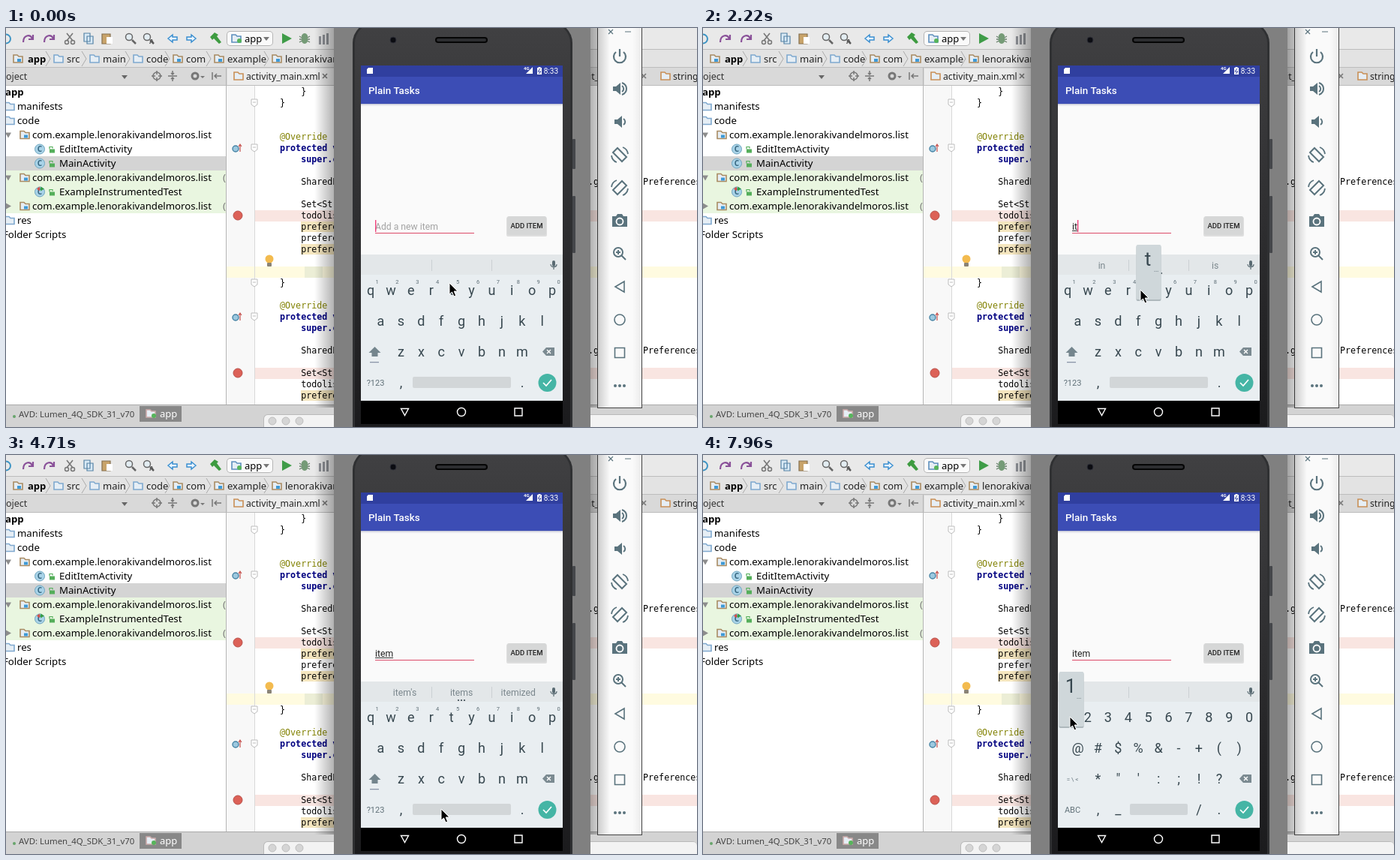
These frames come from a looping animation (921x532 px, 8000 ms). An HTML page with a canvas:

```html
<!DOCTYPE html>
<html lang="en">
<head>
<meta charset="utf-8">
<title>Typing into a phone emulator</title>
<style>
html, body { margin: 0; width: 100%; height: 100%; overflow: hidden; }
canvas { display: block; }
</style>
</head>
<body>
<canvas id="view" width="921" height="532"></canvas>
<script>
const LOOP = 8000, TICK = 147.4;
const UI = "'Noto Sans', sans-serif", MONO = "'DejaVu Sans Mono', monospace", PHONE = "Roboto, sans-serif";
const SLATE = '#5a737d', KEY = '#37474f';
const view = document.getElementById('view').getContext('2d');
const backdrop = document.createElement('canvas');
backdrop.width = 921;
backdrop.height = 532;
let g = backdrop.getContext('2d');

function rect(x, y, w, h, fill, r = 0) {
  g.fillStyle = fill;
  g.beginPath();
  g.roundRect(x, y, w, h, r);
  g.fill();
}
function text(s, x, y, font, fill = '#000', align = 'left') {
  g.font = font;
  g.fillStyle = fill;
  g.textAlign = align;
  g.fillText(s, x, y);
}
function shape(d, x, y, fill, stroke, width = 1.5) {
  const path = new Path2D(d);
  g.save();
  g.translate(x, y);
  if (fill) { g.fillStyle = fill; g.fill(path); }
  if (stroke) { g.strokeStyle = stroke; g.lineWidth = width; g.stroke(path); }
  g.restore();
}
function dot(x, y, r, fill, stroke, width) {
  shape(`M${r} 0A${r} ${r} 0 1 1 ${-r} 0A${r} ${r} 0 1 1 ${r} 0Z`, x, y, fill, stroke, width);
}
function fade(x0, y0, x1, y1, from, to) {
  const grad = g.createLinearGradient(x0, y0, x1, y1);
  grad.addColorStop(0, from);
  grad.addColorStop(1, to);
  return grad;
}
function shadow(x0, x1, from, to) {
  rect(x0, 0, x1 - x0, 506, fade(x0, 0, x1, 0, `rgba(0,0,0,${from})`, `rgba(0,0,0,${to})`));
}

function folder(x, y, color = '#7fa9cf') {
  shape('M-6-5H-1L1-3H6V5H-6Z', x, y, '#e6eef5', color, 1.6);
}
function sourceFolder(x, y) {
  folder(x, y, '#a98b62');
  rect(x - 1, y, 5, 4, '#3f9ad6');
}
function lens(x, y) {
  dot(x - 2, y - 2, 4.5, '#e3edf2', '#666', 1.5);
  shape('M2 2L7 7', x, y, null, '#666', 2.5);
}

function drawToolbar() {
  rect(0, 0, 921, 29, '#e9e9e9');
  rect(0, 29, 921, 24, '#e3e3e3');
  rect(0, 53, 921, 23, '#d9d9d9');
  for (const y of [28, 52, 76]) rect(0, y, 921, 1, '#bdbdbd');
  shape('M-4-4A6 6 0 1 1-4 5', 0, 14, null, '#3d94c4', 2);
  shape('M6 0C3-6-6-5-6 5M7-5V1H1', 57, 14, null, '#8a5199', 2.2);
  shape('M6 0C3-6-6-5-6 5M7-5V1H1', 29, 14, null, '#8a5199', 2.2);
  shape('M-4-7L4 3M4-7L-4 3', 85, 14, null, '#777', 1.6);
  dot(81, 19, 2.5, null, '#777');
  dot(89, 19, 2.5, null, '#777');
  shape('M-6-7H2V4H-6ZM-2-3H6V7H-2Z', 110, 14, '#d8e9f5', '#5683a6', 1.2);
  shape('M-6-6H5V7H-6Z', 134, 14, '#c8a36a', '#85704f', 1.2);
  rect(134, 12, 8, 9, '#fff');
  lens(166, 14);
  lens(190, 14);
  text('A', 191, 21, `bold 9px ${UI}`, '#555');
  for (const [x, s] of [[222, 1], [247, -1]])
    shape(`M${-6 * s} 0L0-5V-2H${6 * s}V2H0V5Z`, x, 14, '#e9f4ff', '#3b8fd0', 1.5);
  shape('M-7-2L-1-8L4-5L2-3L8 5L5 7L-2 0L-4 2Z', 279, 14, '#3d9b40');
  rect(294, 4, 62, 20, '#b5b5b5', 5);
  rect(295, 5, 60, 18, '#fafafa', 4);
  folder(307, 14, '#5d8fbd');
  dot(311, 17, 3, '#56b45b');
  text('app', 318, 19, `13px ${UI}`);
  shape('M-4-2H4L0 3Z', 347, 14, '#777');
  shape('M-6-7L7 0L-6 7Z', 374, 14, '#3f9c48');
  shape('M-7-4L7 4M7-4L-7 4M-7 0H7', 398, 15, null, '#69806c', 1.4);
  shape('M-4-4C-2-8 2-8 4-4V4C2 8-2 8-4 4Z', 398, 14, '#759b77');
  for (let i = 0; i < 3; i++) rect(417 + i * 5, 11 - i * 2, 3, 11 + i * 2, '#8e9196');

  sourceFolder(16, 41);
  text('app', 29, 46, `bold 13px ${UI}`);
  const crumbs = [['src', 70], ['main', 118], ['code', 176], ['com', 229], ['example', 284], ['lenorakivan', 361]];
  for (const [name, x] of crumbs) {
    name.length > 4 || name === 'com' ? sourceFolder(x, 41) : folder(x, 41);
    text(name, x + 11, 46, `13px ${UI}`, '#222');
    shape('M-2-10L4 0L-2 10', x - 15, 41, null, '#aaa', 1);
  }
}

function drawTree() {
  rect(0, 77, 293, 426, '#fff');
  rect(0, 171, 293, 19, '#d4d4d4');
  rect(0, 190, 293, 57, '#e9f6e0');
  text('oject', 0, 69, `12.5px ${UI}`, '#333');
  shape('M-4-2H4L0 3Z', 158, 65, '#666');
  dot(201, 64, 5, null, '#777');
  shape('M-7 0H-2M2 0H7M0-7V-2M0 2V7', 201, 64, null, '#777');
  shape('M-6 0H6M0-7V-2M-2-4L0-2L2-4M0 7V2M-2 4L0 2L2 4', 222, 64, null, '#777');
  dot(252, 64, 4, null, '#777', 3);
  shape('M-3-1H3L0 2Z', 262, 65, '#777');
  shape('M-6-5V5M6 0H-3M0-3L-3 0L0 3', 281, 64, null, '#777');
  const font = `13.2px ${UI}`;
  const pack = 'com.example.lenorakivandelmoros.list';
  const rows = [['app', -1], ['manifests', 15], ['code', 15], [pack, 35], ['EditItemActivity', 71], ['MainActivity', 71],
    [pack, 35], ['ExampleInstrumentedTest', 71], [pack, 35], ['res', 15], ['Folder Scripts', -4]];
  rows.forEach(([name, x], i) => {
    const y = 85.5 + i * 19;
    text(name, x, y + 4.5, i ? font : `bold ${font}`);
    if (x === 15) folder(5, y);
    if (x === 35) {
      sourceFolder(25, y);
      shape(i < 8 ? 'M-4-3H4L0 4Z' : 'M-3-4L4 0L-3 4Z', 3, y, '#8c8c8c');
      if (i > 3) text('(', 289, y + 4.5, font, '#777');
    }
    if (x === 71) {
      dot(45, y, 6.5, '#a9d3e8', '#6ea5bf', 1);
      text('C', 45, y + 3.5, `bold 10px ${UI}`, '#36667f', 'center');
      rect(58, y, 7, 5, '#54ae5a');
      shape('M-2 0V-3H2V-1', 60, y, null, '#54ae5a', 1.2);
      if (i === 7) {
        shape('M0-3L5 0L0 3Z', 46, y - 4, '#379d43');
        shape('M0-3L-4 0L0 3Z', 45, y - 4, '#d34f45');
      }
    }
  });
}

function drawEditor() {
  rect(294, 77, 627, 426, '#fff');
  rect(294, 77, 37, 426, '#f8f8f8');
  rect(294, 318, 627, 15, '#fffbe0');
  rect(398, 318, 24, 15, '#eceed6');
  for (const y of [243, 453]) {
    rect(332, y, 589, 15, '#f9e5e1');
    dot(309, y + 7, 6, '#dc6157', '#b8504a', 1);
  }
  rect(331, 77, 1, 426, '#d9d9d9');
  rect(293, 53, 1, 450, '#b5b5b5');
  rect(295, 54, 142, 22, '#ececec');
  folder(310, 64, '#c98f55');
  text('activity_main.xml', 320, 69, `12.2px ${UI}`, '#222');
  text('it_', 777, 69, `12.2px ${UI}`, '#222');
  folder(879, 64, '#c98f55');
  text('strings', 889, 69, `12.2px ${UI}`, '#222');
  for (const x of [425, 850]) shape('M-3-3L3 3M3-3L-3 3', x, 64, null, '#777', 1.6);

  const font = `11.7px ${MONO}`;
  for (const y of [265, 295, 490]) rect(393, y - 7, 50, 14, '#f5e6bf');
  const code = [[85, '    }'], [100, '}'], [145, '@Override'], [160, 'protected v'], [175, '    super.c'], [205, '    SharedP'],
    [235, '    Set<Str'], [250, '    todolis'], [265, '    prefere'], [280, '    prefere'], [295, '    prefere'], [340, '}'],
    [370, '@Override'], [385, 'protected v'], [400, '    super.c'], [430, '    SharedP'], [460, '    Set<Str'],
    [475, '    todolis'], [490, '    prefere']];
  for (const [y, line] of code) {
    const keyword = /protected|super/.test(line);
    const color = keyword ? '#000080' : line[0] === '@' ? '#808000' : '#000';
    text(line, 365, y + 4, keyword ? `bold ${font}` : font, color);
    if (keyword && line[0] === 'p') {
      dot(306, y + 1, 4, '#9cc8df', '#4784a5', 1.4);
      shape('M0 5V-5M-2-2L0-5L2-2', 312, y, null, '#c75450', 1.2);
    }
    if (keyword && line[0] === 'p' || line === '}')
      shape('M-4-5H4V2L0 5L-4 2ZM-2-1H2', 331, y, '#fff', '#bcbcbc', 1);
  }
  for (const y of [205, 430]) {
    text('.g', 776, y + 4, font);
    text('Preferences', 849, y + 4, font);
  }
  dot(351, 308, 5.5, '#f3bb4f');
  rect(348, 313, 6, 5, '#8a8375', 1);
}

function drawStatusBar() {
  rect(0, 502, 921, 30, '#d3d3d3');
  rect(0, 502, 921, 1, '#aaa');
  rect(178, 504, 56, 21, '#888');
  dot(11, 518, 2, '#67a56b');
  text('AVD: Lumen_4Q_SDK_31_v70', 17, 518.5, `11.4px ${UI}`, '#444');
  folder(193, 514, '#caa');
  dot(197, 517, 3, '#56b45b');
  text('app', 205, 518.5, `13px ${UI}`, '#fff');
  rect(343, 515, 578, 30, '#b9b9b9', 6);
  rect(344, 516, 577, 30, '#f3f3f3', 5);
  for (const x of [355, 373, 391]) dot(x, 524, 5, '#d5d5d5', '#bdbdbd', 1);
}

function drawPhone() {
  shadow(411, 437, 0, .3);
  rect(437, 0, 342, 532, '#808080');
  for (const [y, h] of [[148, 40], [224, 76]]) rect(755, y, 4, h, '#45474b', 1);
  rect(462, -8, 293, 590, '#2f3032', 28);
  rect(465, -6, 287, 582, fade(0, 0, 0, 532, '#404042', '#1b1b1d'), 26);
  rect(572, 12, 70, 8, '#050505', 4);
  rect(574, 14, 66, 4, '#2d2e31', 2);
  dot(516, 16, 4, '#0b0c11', '#2c2d36', 1);
  rect(473, 50, 269, 478, '#000');

  rect(473, 50, 269, 15, '#303f9f');
  rect(473, 65, 269, 36, '#3c4db5');
  rect(473, 101, 269, 202, '#fafafa');
  rect(473, 101, 269, 1, '#b9bcd0');
  rect(473, 102, 269, 2, '#e9e9ee');
  shape('M-2-4H4V4H-4V-2Z', 485, 57, '#fff');
  text('4G', 690, 56, `bold 6px ${PHONE}`, '#fff');
  shape('M4-5V4H-5Z', 698, 57, '#fff');
  shape('M-1.5-5H1.5V-4H3V5H-3V-4H-1.5Z', 711, 57, '#fff');
  shape('M1-3L-2 1H2L-1 4', 711, 57, null, '#303f9f', 1);
  text('8:33', 736, 61, `10px ${PHONE}`, '#fff', 'right');
  text('Plain Tasks', 483, 88, `500 13.4px ${PHONE}`, '#fff');
  rect(667, 252, 54, 26, '#dedede', 2);
  rect(668, 251, 52, 25, '#d6d7d7', 2);
  text('ADD ITEM', 694, 266.8, `500 9.5px ${PHONE}`, '#222', 'center');
  rect(492, 273, 132, 1, '#dc4a68');

  rect(473, 302, 269, 27, '#e3e7e9');
  rect(473, 329, 269, 168, '#e9eef1');
  rect(567, 309, 1, 15, '#cbd0d3');
  rect(647, 309, 1, 15, '#cbd0d3');
  rect(728, 310, 4, 8, '#596a72', 2);
  shape('M-4 0C-4 5 4 5 4 0M0 4V7', 730, 315, null, '#596a72', 1.2);
  shape('M-8 0L-3-5.5H8V5.5H-3Z', 723, 431.5, '#7b8a91');
  shape('M-2-2.5L3 2.5M3-2.5L-2 2.5', 723, 431.5, null, '#fff', 1.3);
  dot(721.5, 473, 12, '#45b5a5');
  shape('M-5 0L-1 4L6-4', 721, 473, null, '#fff', 1.7);

  shape('M-5-4.5H5L0 4.5Z', 531.5, 512, null, '#fff', 1.4);
  dot(607, 512, 5.5, null, '#fff', 1.4);
  shape('M-5-5H5V5H-5Z', 683, 512, null, '#fff', 1.4);
}

function drawSidebar() {
  rect(788, -2, 60, 509, '#444');
  rect(789, 0, 58, 506, '#fafafa');
  shadow(779, 789, .3, .18);
  shadow(789, 805, .18, 0);
  shadow(835, 847, 0, .06);
  shape('M-3-3L3 3M3-3L-3 3M19 0H27', 806, 5, null, SLATE, 1.2);
  shape('M-5-6A8 8 0 1 0 5-6M0-10V0', 818, 38, null, SLATE, 2.2);
  const speaker = 'M-9-3H-5L1-8V8L-5 3H-9Z';
  shape(speaker, 818, 81, SLATE);
  shape('M3-4C6-2 6 2 3 4M3-8C11-5 11 5 3 8', 818, 81, null, SLATE, 2);
  shape(speaker, 820, 125, SLATE);
  shape('M3-4C6-2 6 2 3 4', 820, 125, null, SLATE, 2);
  for (const [y, s] of [[169, 1], [213, -1]]) {
    shape(`M${-9 * s}-3L${-3 * s}-9L${9 * s} 3L${3 * s} 9Z`, 818, y, null, SLATE, 2);
    shape(`M${4 * s}-10Q${10 * s}-8 ${11 * s}-1M${-4 * s} 10Q${-10 * s} 8 ${-11 * s} 1`, 818, y, null, SLATE, 1.8);
  }
  shape('M-10-6H-5L-3-9H3L5-6H10V8H-10Z', 818, 257, SLATE);
  dot(818, 258, 4.5, SLATE, '#fff', 1.8);
  dot(816, 299, 6, null, SLATE, 2);
  shape('M2 2L8 8M-5-2H1M-2-5V1', 818, 301, null, SLATE, 2);
  shape('M-6 0L6-7V7Z', 818, 345, null, SLATE, 1.6);
  dot(818, 389, 7, null, SLATE, 1.6);
  shape('M-6.5-6.5H6.5V6.5H-6.5Z', 818, 433, null, SLATE, 1.6);
  for (const x of [812, 818, 824]) dot(x, 477, 2, SLATE);
}

const typed = [[-1.7, ''], [5.2, 'i'], [13.5, 'it'], [19.8, 'ite'], [27.1, 'item'], [48.9, 'item ']];
const hints = [[0, []], [7, ['in', 'I', 'is']], [16, ["it's", 'it', 'its']], [22, ['items', 'ITE', 'site']],
  [29, ["item's", 'items', 'itemized']], [49, []]];
const presses = [[6, 7, 'i', 674.5, 350], [14, 16, 't', 594, 350], [20, 22, 'e', 540, 350], [27, 29, 'm', 688, 432],
  [54, 56, '1', 486, 350]];
const pointer = [[0, 591, 340], [2, 668, 365], [3, 683, 358], [4, 683, 358], [5, 670, 347], [8, 670, 347], [12, 583, 349],
  [18, 583, 349], [20, 533, 349], [21, 533, 349], [24, 670, 422], [26, 680, 432], [28, 680, 432], [31, 590, 478],
  [32, 580, 472], [33, 580, 472], [36, 490, 470], [41, 491, 470], [43, 598, 474], [49, 598, 474], [53, 489, 349], [60, 489, 349]];
const SYMBOLS_FROM = 37, BLINK = 3.4;

const latest = (list, n) => list.filter(item => item[0] <= n).pop();

function pointerAt(n) {
  const i = pointer.findIndex(p => p[0] > n);
  const [t0, x0, y0] = pointer[i - 1], [t1, x1, y1] = pointer[i];
  const k = (n - t0) / (t1 - t0);
  return [x0 + (x1 - x0) * k, y0 + (y1 - y0) * k];
}

function drawField(n) {
  const [since, value] = latest(typed, n);
  text(value || 'Add a new item', 492, 268.5, `12.2px ${PHONE}`, value ? '#222' : '#a3a3a3');
  const width = value ? g.measureText(value).width : 0;
  if (value && !value.endsWith(' ')) rect(492, 270, width, 1, '#333');
  if (Math.floor((n - since) / BLINK) % 2 === 0) rect(492 + width, 256, 1.4, 16, '#f0407a');
}

function drawHints(n) {
  const words = latest(hints, n)[1];
  words.forEach((word, i) => text(word, 531.5 + i * 75.6, 321, `12.2px ${PHONE}`, '#7b878d', 'center'));
  if (words.length) for (const x of [603, 607, 611]) dot(x, 327, 1.1, KEY);
}

function drawKeys(symbols) {
  const row = (keys, x, y) => [...keys].forEach((key, i) =>
    text(key, x + i * 26.9, y + 6, `18px ${PHONE}`, KEY, 'center'));
  const small = (s, size) => text(s, 492.5, size === 8 ? 435 : 477, `${size}px ${PHONE}`, '#607078', 'center');
  row(symbols ? '1234567890' : 'qwertyuiop', 486, 350);
  row(symbols ? '@#$%&-+()' : 'asdfghjkl', 499.5, 391);
  row(symbols ? '*"\':;!?' : 'zxcvbnm', 526.5, 432);
  row(symbols ? ',_' : ',', 526.5, 473);
  row(symbols ? '/.' : '.', symbols ? 661 : 688, 473);
  small(symbols ? 'ABC' : '?123', 11);
  if (symbols) {
    small('= \\ <', 8);
    rect(569, 465, 77, 15, '#d0d5d8', 2);
  } else {
    [...'1234567890'].forEach((d, i) => text(d, 494.5 + i * 26.9, 341, `7.5px ${PHONE}`, '#5c6c74', 'center'));
    shape('M0-7L8 1H4V6H-4V1H-8Z', 491.5, 432, '#74858d');
    rect(485, 445, 12, 1.3, '#8995a8');
    rect(542, 465, 131, 15, '#d2d6d8', 2);
  }
}

function drawPress([, , key, x, y]) {
  const cx = Math.min(Math.max(x, 491), 724);
  rect(cx - 16.5, y - 60, 33, 74, '#aeb8bc', 2);
  rect(cx - 16.5, y - 61, 33, 73, '#cfd7da', 2);
  text(key, cx - 1, y - 33, `26px ${PHONE}`, KEY, 'center');
  text('…', cx + 10, y - 25, `10px ${PHONE}`, '#75838a', 'center');
}

function draw(now) {
  const n = Math.floor((now % LOOP + 6) / TICK);
  g.drawImage(backdrop, 0, 0);
  drawField(n);
  drawHints(n);
  drawKeys(n >= SYMBOLS_FROM);
  presses.filter(p => n >= p[0] && n < p[1]).forEach(drawPress);
  shape('M0 0V15L3.5 12L6 17.8L8.6 16.7L6.2 11H11Z', ...pointerAt(n), '#000', '#fff', 1);
  requestAnimationFrame(draw);
}

drawToolbar();
drawTree();
drawEditor();
drawStatusBar();
drawPhone();
drawSidebar();
g = view;
requestAnimationFrame(draw);
</script>
</body>
</html>
```
